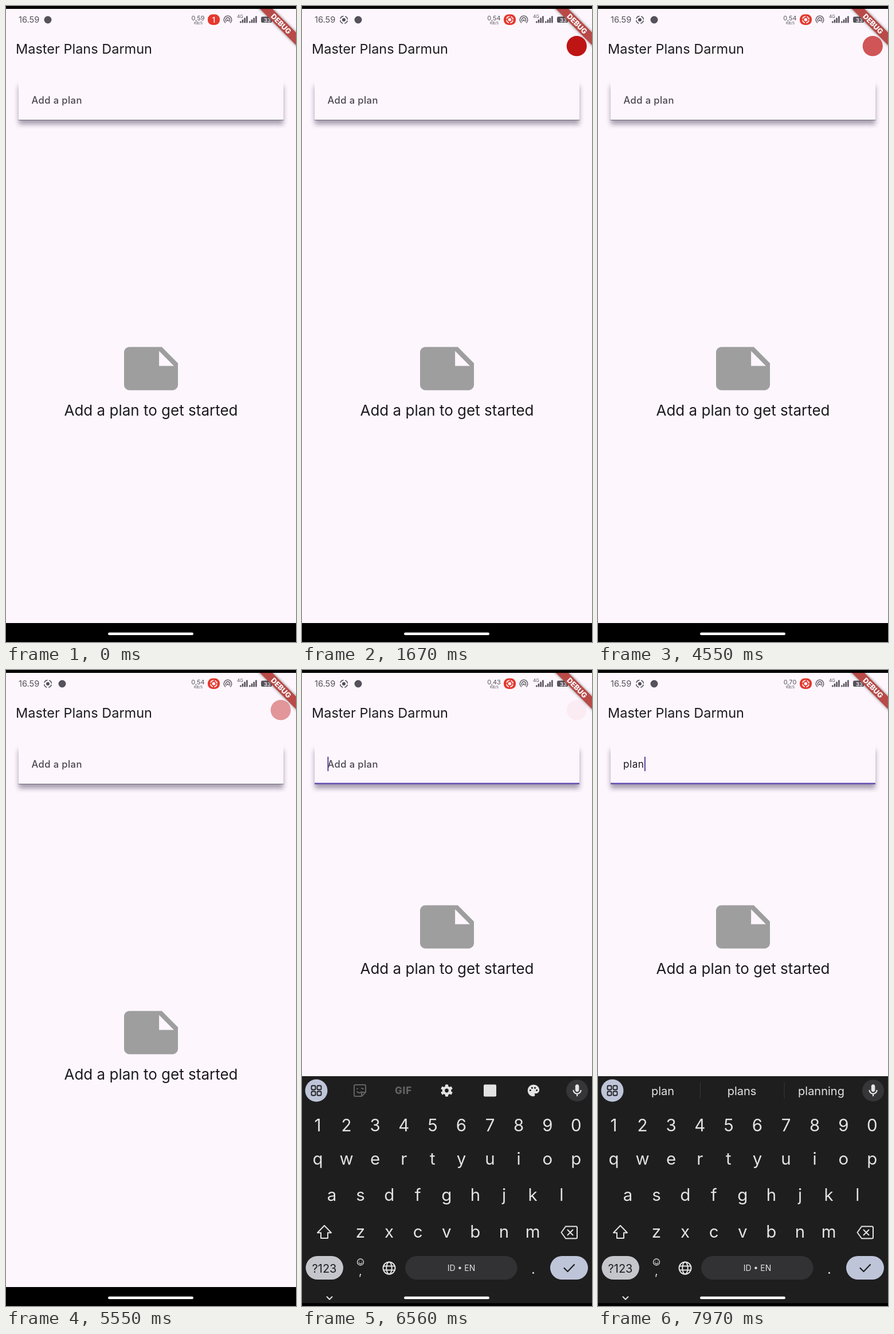
Animation of 506x1107 px, one loop 7.99 s. Source, as an HTML page:

```html
<!DOCTYPE html>
<html lang="en">
<head>
<meta charset="utf-8">
<title>Master Plans</title>
<style>
  html, body { margin: 0; width: 100%; height: 100%; overflow: hidden; background: #000; }
  svg { display: block; width: 506px; height: 1107px; }
  text { font-family: Inter, Roboto, sans-serif; font-optical-sizing: none; white-space: pre; }
  .line { fill: none; stroke-linecap: round; stroke-linejoin: round; }
  .mid text, text.mid { text-anchor: middle; }
</style>
</head>
<body>
<svg viewBox="0 0 506 1107" xmlns="http://www.w3.org/2000/svg">
  <defs>
    <filter id="soft" x="-10%" y="-50%" width="120%" height="200%"><feGaussianBlur stdDeviation="4.5"/></filter>
    <filter id="ribbon" x="-20%" y="-100%" width="140%" height="300%"><feGaussianBlur stdDeviation="2.6"/></filter>
    <clipPath id="screen"><rect y="5" width="506" height="1069"/></clipPath>
    <clipPath id="panel"><rect y="5" width="506" height="1097"/></clipPath>
  </defs>
  <rect width="506" height="1107"/>
  <g clip-path="url(#screen)">
    <rect y="5" width="506" height="1070" fill="#fdf6fd"/>

    <!-- status bar -->
    <g fill="#56525b">
      <text x="22" y="29" font-size="14.6">16.59</text>
      <g id="recNote">
        <circle cx="73" cy="24" r="6.4" fill="none" stroke="#56525b" stroke-width="1.6" stroke-dasharray="7.05 3" stroke-dashoffset="-1.5"/>
        <circle cx="73" cy="24" r="3"/>
      </g>
      <circle id="appNote" cy="24" r="6.5"/>
      <g class="mid">
        <text id="speed" x="335" y="25" font-size="11"></text>
        <text x="335.5" y="32" font-size="6.5">KB/S</text>
        <text x="408.5" y="20.5" font-size="8">4G</text>
      </g>
      <rect x="352" y="14.5" width="21" height="18.5" rx="8.5" fill="#e5382f"/>
      <text id="count" class="mid" x="362.5" y="28.5" font-size="13" font-weight="500" fill="#fff">1</text>
      <g id="recChip">
        <circle cx="362.5" cy="23.8" r="5.6" fill="none" stroke="#fff" stroke-width="1.7" stroke-dasharray="6.4 2.4" stroke-dashoffset="-1.2"/>
        <circle cx="362.5" cy="23.8" r="2.8" fill="#fff"/>
      </g>
      <path class="line" stroke="#56525b" stroke-width="1.4" d="M382.5 29a6.8 6.8 0 1 1 9 0M384.5 26.7a3.7 3.7 0 1 1 5 0"/>
      <circle cx="387" cy="24.8" r="1.5"/>
      <g id="bars"></g>
      <rect x="445" y="18.5" width="19" height="10.5" rx="2.5"/>
      <text x="450" y="27.5" font-size="9.5" font-weight="600" fill="#fdf6fd">33</text>
    </g>

    <text x="17" y="83" font-size="23.5" fill="#1d1b20">Master Plans Darmun</text>

    <!-- input card -->
    <rect x="22" y="139" width="462" height="67" fill="#2c2440" opacity=".42" filter="url(#soft)"/>
    <rect x="22" y="129" width="462" height="70" fill="#fdf6fd"/>
    <rect id="underline" x="22" width="462"/>
    <text id="hint" x="44.5" y="169.5" font-size="16.6" font-weight="500" letter-spacing=".4" fill="#49454f">Add a plan</text>
    <text id="typed" x="44" y="169.5" font-size="17.2" letter-spacing=".5" fill="#1d1b20"></text>
    <rect id="caret" y="151" width="2.2" height="25" fill="#6750a4"/>

    <!-- empty state -->
    <g id="empty">
      <path transform="translate(196.6 574.7) scale(4.7)" fill="#9e9e9e" fill-rule="evenodd" d="M22 10l-6-6H4c-1.1 0-2 .9-2 2v12c0 1.1.9 2 2 2h16c1.1 0 2-.9 2-2zM15 5.5l5.5 5.500H15z"/>
      <text class="mid" x="253" y="713" font-size="26" fill="#1d1b20">Add a plan to get started</text>
    </g>

    <!-- corner ribbon -->
    <g transform="translate(480 31) rotate(45)">
      <rect x="-60" y="-7.7" width="120" height="15.4" opacity=".5" filter="url(#ribbon)"/>
      <rect x="-60" y="-7.7" width="120" height="15.4" fill="#b84a48"/>
      <text class="mid" y="4.5" font-size="12.6" font-weight="800" fill="#fff">DEBUG</text>
    </g>
    <circle id="dot" cx="479.3" cy="69.7" r="17.6" fill="#be1414"/>
  </g>

  <!-- keyboard -->
  <g clip-path="url(#panel)">
    <g id="board">
      <rect y="707" width="506" height="400" fill="#1e1e1f"/>
      <circle cx="25" cy="732" r="19.5" fill="#bfc5d9"/>
      <g id="grid" class="line" stroke="#1e1e1f" stroke-width="1.8"></g>
      <circle cx="480" cy="732" r="19" fill="#363638"/>
      <path transform="translate(467 719) scale(1.09)" fill="#e3e3e3" d="M12 14c1.66 0 3-1.34 3-3V5c0-1.66-1.34-3-3-3S9 3.34 9 5v6c0 1.66 1.34 3 3 3zm5-3c0 2.76-2.24 5-5 5s-5-2.24-5-5H5c0 3.53 2.61 6.43 6 6.92V21h2v-3.08c3.39-.49 6-3.39 6-6.92z"/>

      <g id="tools">
        <g class="line" stroke="#626264" stroke-width="2">
          <path d="M93 722h16a2 2 0 0 1 2 2v11l-7 7h-11a2 2 0 0 1-2-2v-16a2 2 0 0 1 2-2zM111 735h-5a2 2 0 0 0-2 2v5"/>
          <path d="M96 734q4 4 8 0M96 729h1M104 728l3 1"/>
        </g>
        <text class="mid" x="177" y="738" font-size="17" font-weight="800" letter-spacing=".8" fill="#626264">GIF</text>
        <g transform="translate(252.5 732)">
          <g id="teeth" fill="#e3e3e3"></g>
          <circle class="line" r="5.6" stroke="#e3e3e3" stroke-width="4.4"/>
        </g>
        <rect x="317" y="721.5" width="22" height="21" rx="2" fill="#e3e3e3"/>
        <g transform="translate(391.7 719.7) scale(1.02)">
          <path fill="#e3e3e3" d="M12 2C6.5 2 2 6.5 2 12s4.5 10 10 10c1.4 0 2.5-1.1 2.5-2.5 0-.6-.2-1.2-.6-1.7-.4-.4-.1-.8.4-.8H16c3.3 0 6-2.7 6-6 0-5-4.5-9-10-9z"/>
          <g fill="#1e1e1f"><circle cx="6.5" cy="11.5" r="1.5"/><circle cx="9.5" cy="7.5" r="1.5"/><circle cx="14.5" cy="7.5" r="1.5"/><circle cx="17.5" cy="11.5" r="1.5"/></g>
        </g>
      </g>
      <g id="words" class="mid" font-size="20" fill="#e3e3e3">
        <text x="113" y="740">plan</text>
        <text x="251" y="740">plans</text>
        <text x="389.5" y="740">planning</text>
        <path d="M178.5 718v28M325 718v28" stroke="#38383a"/>
      </g>

      <g id="keys" class="mid" font-size="29.5" fill="#e3e3e3"></g>

      <g class="line" stroke="#e3e3e3" stroke-width="2">
        <path d="M39 967l12 12.5h-6v9.5h-12v-9.5h-6z"/>
        <path d="M460 968.5h18a2 2 0 0 1 2 2v17a2 2 0 0 1-2 2h-18l-7.5-10.5zM463.5 974.5l9 9M472.5 974.5l-9 9"/>
        <circle cx="152" cy="1041" r="10.5"/>
        <ellipse cx="152" cy="1041" rx="4.7" ry="10.5"/>
        <path d="M142.5 1037.5h19M142.5 1044.5h19"/>
        <path d="M43.5 1091l4.5 4.5 4.5-4.5"/>
        <g stroke-width="1.3">
          <circle cx="102" cy="1030.5" r="5.5"/>
          <path d="M99.3 1031.8q2.7 3.6 5.4 0M100 1028.8h.1M104 1028.8h.1"/>
        </g>
      </g>
      <g class="mid" fill="#e3e3e3">
        <text x="102" y="1053" font-size="20">,</text>
        <text x="403.5" y="1051" font-size="24">.</text>
        <rect x="6.5" y="1020" width="65.5" height="41" rx="20.5" fill="#c5c5cc"/>
        <text x="39" y="1048.5" font-size="20" fill="#1e1e1f">?123</text>
        <rect x="180" y="1020" width="195.5" height="41" rx="20.5" fill="#323234"/>
        <text x="278" y="1046" font-size="14">ID • EN</text>
        <rect x="433" y="1020" width="66" height="41" rx="20.5" fill="#bfc5d9"/>
      </g>
      <path class="line" d="M457.5 1041l6 6 11.5-12" stroke="#1e1e1f" stroke-width="2.2"/>
    </g>
  </g>
  <rect x="178" y="1090.5" width="149" height="4.5" rx="2.25" fill="#fff"/>
</svg>
<script>
const LOOP = 7990;
const $ = id => document.getElementById(id);
const show = (id, on) => $(id).setAttribute('visibility', on ? 'visible' : 'hidden');
const range = n => [...Array(n).keys()];

// static parts built by rule
$('bars').innerHTML = [408, 424].map(x => range(4).map(i =>
  `<rect x="${x + i * 3.7}" y="${26.5 - i * 3}" width="2.6" height="${3 + i * 3}" rx=".8"/>`).join('')).join('');
$('grid').innerHTML = range(4).map(i =>
  `<rect x="${16.5 + i % 2 * 10}" y="${723.5 + (i >> 1) * 10}" width="7" height="7" rx="1.8"/>`).join('');
$('teeth').innerHTML = range(6).map(i =>
  `<rect x="-2.6" y="-10.5" width="5.2" height="5" rx="1" transform="rotate(${i * 60})"/>`).join('');
$('keys').innerHTML = [
  ['1234567890', 27.5, 803],
  ['qwertyuiop', 27.5, 861],
  ['asdfghjkl', 52, 924],
  ['zxcvbnm', 102, 987.5]
].map(([row, x, y]) => [...row].map((c, i) =>
  `<text x="${x + i * 50.1}" y="${y}">${c}</text>`).join('')).join('');

// pulse of the recording dot: time, opacity
const PULSE = [
  [30, 1], [820, 0], [920, 0], [1670, 1], [1770, 1], [2530, 0],
  [2630, 0], [2870, .41], [3410, 1], [3440, 1], [4180, 0],
  [4280, 0], [4550, .71], [5030, 1], [5130, 1], [5860, 0],
  [5960, 0], [6100, .3], [6240, .42], [6560, .04], [6600, 0]
];
const KEY_TIMES = [7000, 7250, 7500, 7750];

function track(keys, t) {
  if (t < keys[0][0]) return 0;
  const n = keys.findIndex(k => k[0] > t);
  if (n < 0) return keys[keys.length - 1][1];
  const [t0, a] = keys[n - 1], [t1, b] = keys[n];
  return a + (b - a) * (t - t0) / (t1 - t0);
}

// cubic-bezier(.4, 0, .2, 1)
function slide(start, t) {
  const x = Math.min(1, Math.max(0, (t - start) / 300));
  let lo = 0, hi = 1;
  for (let i = 0; i < 20; i++) {
    const s = (lo + hi) / 2, r = 1 - s;
    if (1.2 * r * r * s + .6 * r * s * s + s ** 3 < x) lo = s; else hi = s;
  }
  return hi * hi * (3 - 2 * hi);
}

function draw(t) {
  const recording = t >= 30, noted = t >= 1000, focused = t >= 5800;
  const typed = 'plan'.slice(0, KEY_TIMES.filter(k => t >= k).length);

  show('count', !recording);
  show('recChip', recording);
  show('recNote', noted);
  $('appNote').setAttribute('cx', noted ? 98 : 73);
  $('speed').textContent = t < 1000 ? '0,59' : t < 6000 ? '0,54' : t < 7700 ? '0,43' : '0,70';
  $('dot').setAttribute('opacity', track(PULSE, t));

  const line = $('underline');
  line.setAttribute('y', focused ? 196.4 : 198);
  line.setAttribute('height', focused ? 2.6 : 1);
  line.setAttribute('fill', focused ? '#6750b0' : '#6f6a78');

  show('hint', !typed);
  $('typed').textContent = typed;
  const end = typed ? $('typed').getComputedTextLength() : 0;
  $('caret').setAttribute('x', 44.3 + end);
  show('caret', typed || (t >= 6300 && t < 6800));

  $('empty').setAttribute('transform', `translate(0 ${-184 * slide(6036.5, t)})`);
  $('board').setAttribute('transform', `translate(0 ${400 * (1 - slide(6004.5, t))})`);
  show('board', t >= 6004);
  $('tools').style.display = typed ? 'none' : '';
  $('words').style.display = typed ? '' : 'none';
}

const begin = performance.now();
function tick() {
  draw((performance.now() - begin) % LOOP);
  requestAnimationFrame(tick);
}
tick();
</script>
</body>
</html>
```
